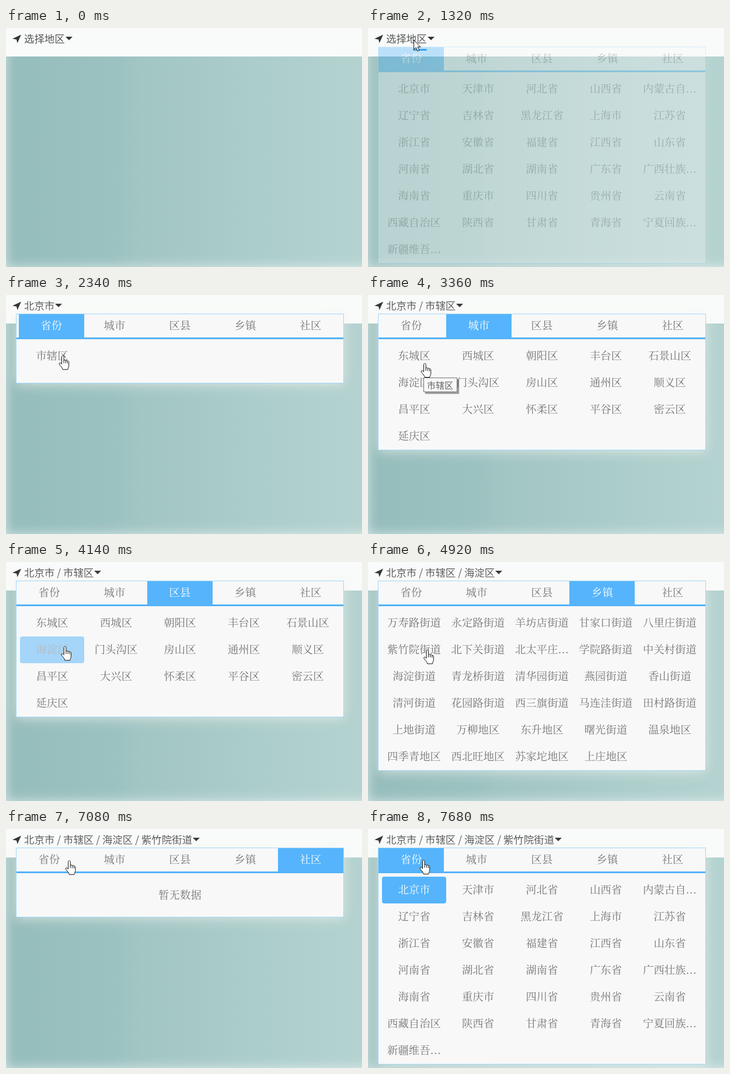
An HTML page for the animation above (8000 ms loop, 610 px wide and 411 px high).

```html
<!DOCTYPE html>
<html lang="zh-CN">
<head>
<meta charset="utf-8">
<title>选择地区</title>
<style>
html, body { margin: 0; width: 100%; height: 100%; overflow: hidden; }
#stage {
  position: relative; width: 610px; height: 411px; overflow: hidden; white-space: nowrap;
  font: 18.4px/46px "Liberation Serif", "Noto Serif CJK SC", "Noto Sans CJK SC", "Noto Sans CJK", serif;
  color: #747474;
}
#stage div, #stage svg { position: absolute; box-sizing: border-box; }
#backdrop {
  left: 0; top: 24px; width: 650px; bottom: 0;
  background: linear-gradient(90deg, #95bdbb, #9bc2c0 28%, #a2c6c4 36%, #aaccca 62%, #b3d2d0 92%);
  box-shadow: inset 0 0 20px rgba(255, 255, 255, .6);
}
#header { left: 0; top: 0; width: 100%; height: 49px; background: #f9fbfa; }
#title {
  left: 31px; top: 0; color: #565656; font: 300 17.45px/36px "Noto Sans CJK SC", "Noto Sans CJK", sans-serif;
}
#title::after {
  content: ""; display: inline-block; margin-left: 1px; vertical-align: 4px;
  border: 6px solid transparent; border-top-color: #333; border-bottom: 0;
}
#underline { left: 29px; top: 36px; width: 120px; height: 3px; background: #2196e3; }
#panel {
  left: 17px; top: 32px; width: 562px; background: #f8f8f8; border: 1px solid #a0d8fb;
  box-shadow: 0 2px 20px rgba(248, 244, 240, .65);
}
#rule { left: 0; top: 40px; width: 100%; height: 3px; background: #54b2f8; }
.tab { top: 0; width: 20%; height: 40px; line-height: 41px; text-align: center; }
#marker { background: #55b4fb; color: #fff; font-weight: 500; }
.view { left: 6px; top: 49px; width: 548px; display: grid; grid-template-columns: repeat(5, 109.5px); }
#stage .cell { position: relative; width: 110px; height: 46px; text-align: center; }
.glow { inset: 0; border-radius: 4px; background: #55b4fb; color: #fff; font-weight: 500; }
.empty { top: 9px; width: 100%; text-align: center; }
#tip {
  height: 25px; padding: 0 6px 0 5px; border: 1px solid #767676; background: #f7f8f8; color: #646464;
  box-shadow: 3px 3px 1px rgba(70, 70, 70, .5);
  font: 300 15px/23px "Noto Sans CJK SC", "Noto Sans CJK", sans-serif;
}
</style>
</head>
<body>
<div id="stage">
  <div id="backdrop"></div>
  <div id="header"></div>
  <svg style="left:0;top:0" width="30" height="30"><path d="M26 11.5 19.5 26 18 19.8 11 18.5Z" fill="#333"/></svg>
  <div id="title"></div>
  <div id="underline"></div>
  <div id="panel"><div id="rule"></div></div>
  <div id="tip"></div>
  <svg id="arrow" width="14" height="24"><path d="M.6.8V17l3.800-3.500 2.600 6.200 2.700-1.100-2.600-6H12Z" fill="#fff" stroke="#111"/></svg>
  <svg id="hand" width="20" height="27"><path d="M5.500 15V2.600c0-2.600 3.600-2.600 3.600 0V9c.6-1.400 3-1.200 3.200.4.8-1 2.800-.7 3 .8 1-.6 2.400 0 2.400 1.500v6c0 3-1.600 4-1.900 6.800H7.200C6.800 21.300 3.600 18.800 1.300 15.300c-1-1.700 1-3.100 2.400-1.800Z" fill="#fff" stroke="#111"/><path d="M9.100 9v4.500M12.300 9.500v4M15.300 10.500v3.500" stroke="#111" fill="none"/></svg>
</div>
<script>
const LOOP = 8000, STEP = 60, OPEN = 1200, HOME = 7380, TRAVEL = 450;
const $ = id => document.getElementById(id);
const ramp = (t, from, to) => Math.min(1, Math.max(0, (t - from) / (to - from)));
const smooth = x => x * x * (3 - 2 * x);
const easeOut = x => 1 - (1 - x) ** 3 * (1 + 3 * x);

const tabNames = '省份 城市 区县 乡镇 社区'.split(' ');
const lists = [
  '北京市 天津市 河北省 山西省 内蒙古自… 辽宁省 吉林省 黑龙江省 上海市 江苏省 浙江省 安徽省 福建省 江西省 山东省 ' +
  '河南省 湖北省 湖南省 广东省 广西壮族… 海南省 重庆市 四川省 贵州省 云南省 西藏自治区 陕西省 甘肃省 青海省 宁夏回族… 新疆维吾…',
  '市辖区',
  '东城区 西城区 朝阳区 丰台区 石景山区 海淀区 门头沟区 房山区 通州区 顺义区 昌平区 大兴区 怀柔区 平谷区 密云区 延庆区',
  '万寿路街道 永定路街道 羊坊店街道 甘家口街道 八里庄街道 紫竹院街道 北下关街道 北太平庄… 学院路街道 中关村街道 ' +
  '海淀街道 青龙桥街道 清华园街道 燕园街道 香山街道 清河街道 花园路街道 西三旗街道 马连洼街道 田村路街道 ' +
  '上地街道 万柳地区 东升地区 曙光街道 温泉地区 四季青地区 西北旺地区 苏家坨地区 上庄地区',
  ''
].map(names => names.split(' ').filter(Boolean));

// One pick per list: the pointer arrives, the cell lights up, a tip shows if the click comes late.
const picks = [
  { name: '北京市', arrive: 2160, click: 2340, x: 97, y: 104 },
  { name: '市辖区', arrive: 2760, click: 3360, x: 97, y: 117.5 },
  { name: '海淀区', arrive: 4260, click: 4680, x: 101.6, y: 151 },
  { name: '紫竹院街道', arrive: 5460, click: 6000, x: 101.6, y: 161 }
];
const stops = [
  { arrive: 0, x: 208, y: -24 },
  { arrive: 1020, x: 78, y: 20 },
  ...picks,
  { arrive: 6780, x: 170, y: 58 },
  { arrive: 7200, x: 95, y: 53.5 }
];

function add(parent, className, text = '') {
  const node = document.createElement('div');
  node.className = className;
  node.textContent = text;
  return parent.appendChild(node);
}

function place(node, x, y) {
  node.style.transform = `translate(${x}px, ${y}px)`;
}

tabNames.forEach((name, i) => add($('panel'), 'tab', name).style.left = i * 20 + '%');
const marker = add($('panel'), 'tab');
marker.id = 'marker';

const views = lists.map((names, i) => {
  const view = add($('panel'), 'view');
  for (const name of names) {
    const cell = add(view, 'cell', name);
    if (name === picks[i].name) picks[i].glow = add(cell, 'glow', name);
  }
  if (!names.length) add(view, 'empty', '暂无数据');
  return view;
});

function drawPanel(t) {
  const chosen = picks.filter(pick => t >= pick.click);
  const shown = t < HOME ? chosen.length : 0;
  $('title').textContent = chosen.map(pick => pick.name).join(' / ') || '选择地区';
  $('panel').style.opacity = ramp(t, OPEN, OPEN + 330);
  $('panel').style.height = Math.max(120, 51 + 46 * Math.ceil(lists[shown].length / 5)) + 'px';
  views.forEach((view, i) => view.style.display = i === shown ? '' : 'none');

  let tab = -picks.length * easeOut(ramp(t, HOME - 60, HOME + 300));
  for (const { arrive, click, glow } of picks) {
    tab += easeOut(ramp(t, click - 30, click + 350));
    glow.style.opacity = ramp(t, arrive - 240, arrive);
  }
  marker.style.left = tab * 20 + '%';
  marker.textContent = tabNames[Math.round(tab)];
}

function drawTip(t) {
  const pick = picks.find(p => t >= p.arrive + 180 && t < p.click + 240 && p.click - p.arrive > 240);
  $('tip').style.opacity = pick ? ramp(t, pick.arrive + 180, pick.arrive + 300) - ramp(t, pick.click, pick.click + 240) : 0;
  if (!pick) return;
  $('tip').textContent = pick.name;
  place($('tip'), Math.round(pick.x - 2), Math.round(pick.y + 24.4));
}

function drawPointer(t) {
  let { x, y } = stops[0];
  stops.slice(1).forEach((stop, i) => {
    const k = smooth(ramp(t, stop.arrive - TRAVEL, stop.arrive));
    x += (stop.x - stops[i].x) * k;
    y += (stop.y - stops[i].y) * k;
  });
  const overPanel = t >= picks[0].arrive - TRAVEL;
  $('arrow').style.display = overPanel ? 'none' : '';
  $('hand').style.display = overPanel ? '' : 'none';
  place($('arrow'), x, y);
  place($('hand'), x - 7, y - 0.5);
}

function draw(t) {
  drawPanel(t);
  drawTip(t);
  drawPointer(t);
  const line = smooth(ramp(t, 720, 1000)) - smooth(ramp(t, OPEN - 60, OPEN + 190));
  $('underline').style.transform = `scaleX(${line})`;
}

const begin = performance.now();
function tick() {
  const t = (performance.now() - begin) % LOOP;
  draw(Math.floor(t / STEP) * STEP);
  requestAnimationFrame(tick);
}
tick();
</script>
</body>
</html>
```
